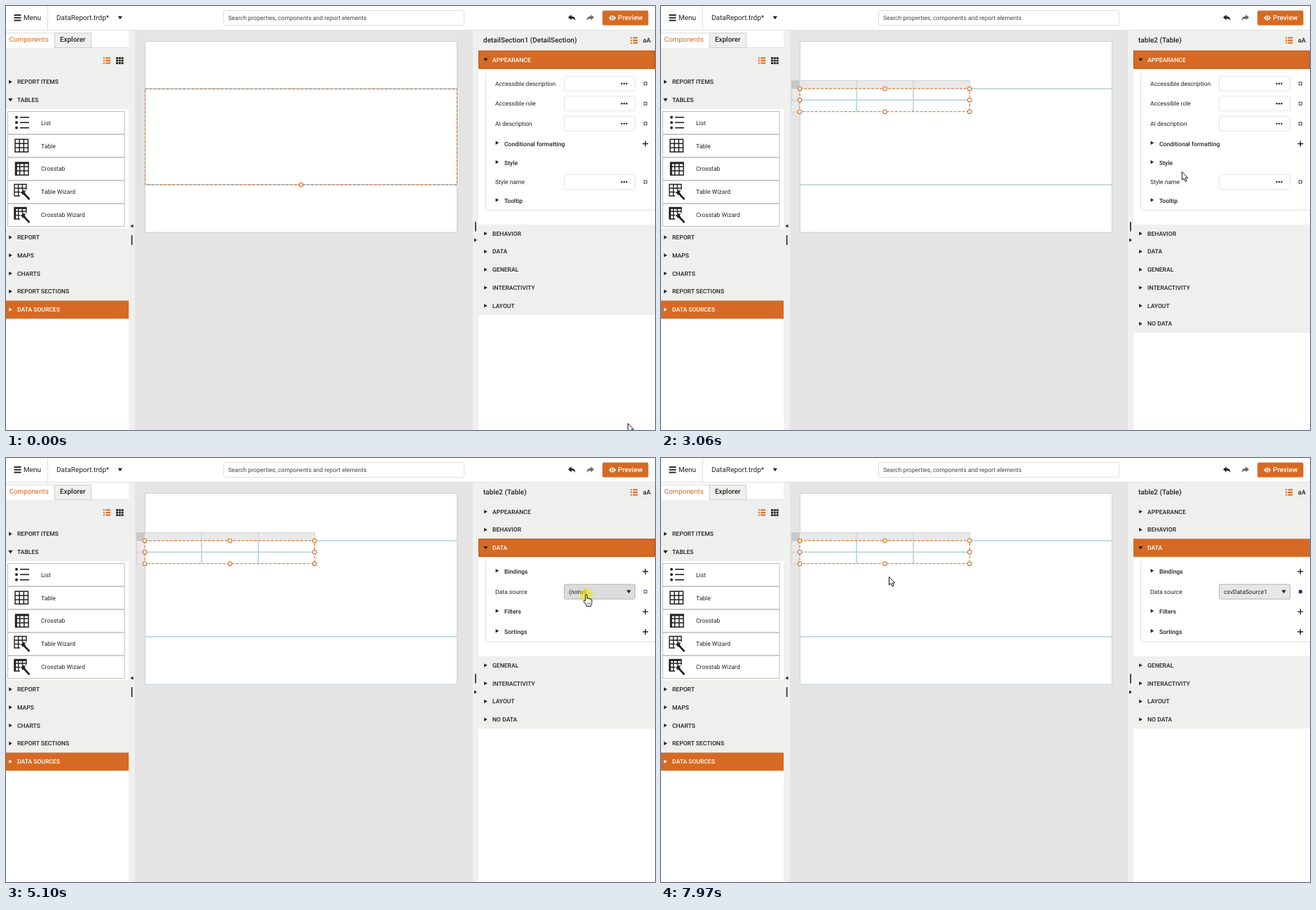
Recreate the animation shown at these times as an HTML page. Size 926 px wide and 605 px high, loop 8 s.

```html
<!DOCTYPE html>
<html lang="en">
<head>
<meta charset="utf-8">
<title>Report designer</title>
<style>
html, body { margin: 0; width: 100%; height: 100%; overflow: hidden; background: #fff; }
svg { display: block; width: 926px; height: 605px; }
text { font-family: Roboto, "Open Sans", sans-serif; text-rendering: geometricPrecision; white-space: pre; }
</style>
</head>
<body>
<svg id="stage" viewBox="0 0 926 605" xmlns="http://www.w3.org/2000/svg">
  <defs>
    <filter id="shade" x="-20%" y="-20%" width="140%" height="140%">
      <feDropShadow dx="0" dy="2" stdDeviation="2" flood-opacity=".22"/>
    </filter>
  </defs>
  <g id="frame"></g>
  <g id="live"></g>
</svg>
<script>
const LOOP = 8000;
const ORANGE = '#d66a24', PANEL = '#efefed', INK = '#222', BLUE = '#b4d0e0';
const ROW = 25.75, TOP = 63.7;

// drawing helpers
const rect = (x, y, w, h, fill, more = '') =>
  `<rect x="${x}" y="${y}" width="${w}" height="${h}" fill="${fill}" ${more}/>`;
const line = (d, color = INK, width = 1, more = '') =>
  `<path d="${d}" fill="none" stroke="${color}" stroke-width="${width}" ${more}/>`;
const shape = (d, fill = INK, more = '') => `<path d="${d}" fill="${fill}" ${more}/>`;
const dot = (x, y, r, fill, more = '') => `<circle cx="${x}" cy="${y}" r="${r}" fill="${fill}" ${more}/>`;
const text = (x, y, s, { size = 8.57, color = INK, weight = 400 } = {}) =>
  `<text x="${x}" y="${y}" font-size="${size}" fill="${color}" font-weight="${weight}">${s}</text>`;
const right = (x, y, c = INK) => shape(`M${x} ${y - 2.7}L${x + 4.6} ${y}L${x} ${y + 2.7}Z`, c);
const down = (x, y, c = INK) => shape(`M${x} ${y - 2.2}H${x + 6.4}L${x + 3.2} ${y + 2.4}Z`, c);
const border = c => `stroke="${c}" stroke-width="1"`;
const mix = (a, b, p) => `rgb(${a.map((v, i) => Math.round(v + (b[i] - v) * p))})`;
const each = (list, fn) => list.map(fn).join('');

function grid(x, y, w, h, width = 1.5) {
  const a = w / 3, b = h / 3;
  return line(`M${x} ${y}h${w}v${h}h${-w}zM${x + a} ${y}v${h}M${x + 2 * a} ${y}v${h}` +
    `M${x} ${y + b}h${w}M${x} ${y + 2 * b}h${w}`, INK, width);
}

function wizard(y, cross) {
  return grid(12, y - 10.5, 17, 16.5, 1.4) +
    (cross ? line(`M12 ${y - 9.5}h17M13 ${y - 10.5}v16.5`, INK, 2.4) : '') +
    shape(`M20 ${y - 3}h12v12h-12z`, '#fff') +
    line(`M25 ${y + 2}L33.5 ${y + 11}`, INK, 2.6) +
    shape(`M24 ${y - 4}l1.3 2.6 3-.4-1.6 2.5 1.6 2.6-3-.4-1.6 2.4-.7-2.9-2.8-1.1 2.6-1.5z`);
}

function bullets(x, y) {
  return each([-3.6, 0, 3.6], d =>
    rect(x, y + d - 1, 2, 2, ORANGE) + rect(x + 3.4, y + d - 1, 6.8, 2, ORANGE));
}

function topBar() {
  return rect(0, 0, 926, 35, '#fff') + line('M0 34.5H926M59.5 0V34', '#e0e0e0') +
    each([12, 15.8, 19.6], y => rect(11.5, y, 10, 1.9, INK)) +
    text(25, 20.3, 'Menu', { size: 10 }) +
    text(72, 20.3, 'DataReport.trdp*', { size: 10 }) + down(159.6, 16.8) +
    rect(310.5, 6.5, 343, 21, '#fff', border('#dedede') + ' rx="2"') +
    text(317, 20.3, 'Search properties, components and report elements', { color: '#444' }) +
    shape('M802 16.2l4.6-4v2.5c4 0 6 2.2 5.6 6.3-1-2.4-2.5-3.3-5.6-3.3v2.6z') +
    shape('M839 16.2l-4.6-4v2.5c-4 0-6 2.2-5.6 6.3 1-2.4 2.5-3.3 5.6-3.3v2.6z', '#666') +
    rect(851, 6.5, 65.5, 21, ORANGE, 'rx="2"') +
    shape('M860 17q5.2-7 10.4 0q-5.2 7-10.4 0z', '#fff') +
    dot(865.2, 17, 2.3, ORANGE) + dot(865.2, 17, 1.2, '#fff') +
    text(873, 20.3, 'Preview', { size: 10, color: '#fff', weight: 500 });
}

function leftPanel() {
  const heads = [['REPORT ITEMS', 108.3], ['TABLES', 134], ['REPORT', 330], ['MAPS', 355.8],
    ['CHARTS', 381.6], ['REPORT SECTIONS', 407.3], ['DATA SOURCES', 433.1]];
  const tools = ['List', 'Table', 'Crosstab', 'Table Wizard', 'Crosstab Wizard'];
  return rect(0, 35, 175, 570, '#fff') + rect(0, 60, 175, 87, PANEL) + rect(0, 317, 175, 104, PANEL) +
    rect(69.5, 38.5, 52, 21, PANEL, border('#cfcfcf')) + line('M0 38.5H69M122 59.5H175', '#dedede') +
    text(4.5, 51.3, 'Components', { size: 9.9, color: ORANGE }) +
    text(77, 51.3, 'Explorer', { size: 9.9, weight: 500 }) +
    bullets(138.8, 77.8) +
    each([0, 1, 2], i => each([0, 1, 2], j => rect(157 + i * 3.8, 73 + j * 3.6, 3, 2.7, INK))) +
    rect(0, 420.4, 175, 25.8, ORANGE) +
    each(heads, ([s, y], i) => {
      const color = i === 6 ? '#fff' : INK;
      return (i === 1 ? down(3.2, y) : right(4.2, y, color)) + text(16, y + 3.1, s, { weight: 500, color });
    }) +
    each(tools, (s, i) => rect(2.5, 150.5 + i * 32.9, 166.5, 32.4, '#fff', border('#bcbcbc')) +
      text(50, 169.6 + i * 32.9, s)) +
    each([158.8, 166.3, 173.8], y => dot(15, y, 2, INK) + rect(20, y - .8, 13, 1.6, INK)) +
    grid(13, 190.3, 18.5, 18) + grid(13.5, 223.3, 18.5, 18) +
    line('M13 224.2H32.6M14.4 223V241.6', INK, 2.8) + wizard(265, false) + wizard(298, true);
}

function middle() {
  return rect(175, 35, 9, 570, '#f0f0ef') + rect(184, 35, 482, 570, '#e4e4e4') +
    rect(666, 35, 8, 570, '#f0f0ef') +
    shape('M181.4 311.4V316.6L177.4 314Z') + rect(178.8, 327, 1.6, 14, INK) +
    rect(669.2, 308, 1.6, 13.5, INK) + shape('M668 331.4V336.6L672 334Z') +
    rect(198.5, 50.5, 445, 272.5, '#fff', border('#c3d5df')) +
    line('M198 118H644M198 255H644', BLUE, 1.5) +
    rect(674, 35, 252, 570, '#fff') + rect(674, 35, 252, 28.7, PANEL) +
    bullets(891, 49) + text(908.8, 52.4, 'aA', { size: 9.3, weight: 500 });
}

const dashed = (x, y, w, h) => rect(x, y, w, h, 'none', `stroke="${ORANGE}" stroke-dasharray="4 2"`);
const handle = (x, y) => dot(x, y, 2.8, '#fff', `stroke="${ORANGE}" stroke-width="1.1"`);

const sectionMark = () => dashed(198.5, 118.3, 445, 136.7) + handle(421, 255);

function table() {
  return rect(186.5, 106.5, 254, 11.5, '#e9e9e9', border('#d2d2d2')) +
    rect(186.5, 118, 11.5, 33, '#e9e9e9', border('#d2d2d2')) +
    rect(186, 106, 12, 12, '#c8c8c8') +
    line('M279 106V118M360 106V118M186 134.3H198', '#c9c9c9') +
    rect(198, 118, 242.5, 33, '#fff') +
    line('M279 118V151M360 118V151M198 134.3H440', BLUE, 1.5) +
    dashed(198, 118, 242.5, 32.7) +
    each([[198, 118], [319.5, 118], [440.3, 118], [198, 134.3], [440.3, 134.3],
      [198, 150.8], [319.5, 150.8], [440.3, 150.8]], p => handle(...p));
}

// property rows
const flag = (y, color = '#444', fill = '#fff') => rect(910.3, y - 2, 4, 4, fill, border(color));
const plus = y => line(`M908.3 ${y}h8M912.3 ${y - 4}v8`, INK, 1.4);
const group = (y, s) => right(698.6, y - 1.2) + text(711, y + 3.1, s, { weight: 500 });
const field = (y, s) => text(698, y + 3.1, s) +
  rect(796.5, y - 10.5, 101, 21, '#fff', border('#e4e4e4') + ' rx="2"') +
  each([878.6, 882, 885.4], x => dot(x, y, 1.2, INK)) + flag(y);

function appearanceRows(y) {
  return field(y + 21.3, 'Accessible description') + field(y + 49.8, 'Accessible role') +
    field(y + 78.4, 'AI description') +
    group(y + 107, 'Conditional formatting') + plus(y + 107) + group(y + 134.4, 'Style') +
    field(y + 161.5, 'Style name') + group(y + 188.6, 'Tooltip');
}

function dataRows(y, t) {
  const active = t >= 5010, picked = t >= 6750, s = y + 49.8;
  return group(y + 21.1, 'Bindings') + plus(y + 21.1) + text(698, s + 3.1, 'Data source') +
    rect(796.5, s - 10.5, 101, 21, active && !picked ? '#dcdcdc' : '#e7e7e7',
      border(active ? '#b5b5b5' : '#cfcfcf') + ' rx="2"') +
    text(803, s + 3.1, picked ? 'csvDataSource1' : '(none)') + down(885.4, s) +
    flag(s, active ? '#4a4596' : '#444', picked ? INK : '#fff') +
    group(y + 78.4, 'Filters') + plus(y + 78.4) + group(y + 107, 'Sortings') + plus(y + 107);
}

function body(y, h, id, rows) {
  if (h < 1) return '';
  const end = Math.max(y + 8, y + h - 20.6);
  return `<clipPath id="${id}">${rect(674, y, 252, end - y, '#000')}</clipPath>` +
    `<g clip-path="url(#${id})">${rows}</g>` +
    line(`M684.5 ${y + 7}V${end - 2}q0 2 2 2H926`, '#dedede');
}

function header(y, s, { open = false, glow = 0, focus = false } = {}) {
  const c = y + ROW / 2;
  return rect(674, y, 252, ROW + .2, mix([239, 239, 237], [214, 106, 36], glow)) +
    (focus ? rect(674.5, y + .5, 251, ROW - 1, 'none', border('#b5561a')) : '') +
    (open ? down(681.2, c) : right(682.2, c)) +
    text(694, c + 3.1, s, { weight: 500, color: mix([34, 34, 34], [255, 255, 255], glow) });
}

// progress that advances in n even jumps, the first at t0 and the last at t1
function jumps(t, t0, t1, n) {
  if (t < t0) return 0;
  if (t >= t1) return 1;
  return (Math.floor((t - t0) / (t1 - t0) * (n - 1) + 1e-6) + 1) / n;
}

function accordion(t) {
  const k = [4230, 4290, 4380, 4450].filter(v => t >= v).length;
  const shut = [0, .2, .65, .95, 1][k], open = [0, .3, .745, .97, 1][k], fade = [0, .2, .5, .85, 1][k];
  const lit = t < 1900 ? 1 : jumps(t, 1980, 2120, 3);
  const h1 = 222.3 * (1 - shut), h2 = 142 * open;
  const names = ['BEHAVIOR', 'DATA', 'GENERAL', 'INTERACTIVITY', 'LAYOUT'];
  if (t >= 1900) names.push('NO DATA');
  let y = TOP + ROW;
  let out = header(TOP, 'APPEARANCE', { open: k === 0, glow: lit * (1 - fade), focus: k === 0 && lit === 1 }) +
    body(y, h1, 'clipA', appearanceRows(y));
  y += h1;
  for (const s of names) {
    const isData = s === 'DATA';
    out += header(y, s, isData ? { open: k > 0, glow: fade, focus: k > 2 && t < 5230 } : {});
    y += ROW;
    if (isData) {
      out += body(y, h2, 'clipD', dataRows(y, t));
      y += h2;
    }
  }
  return out;
}

function dropdown(t, hover) {
  const p = jumps(t, 5300, 5440, 3) - jumps(t, 6820, 6970, 3);
  if (p <= 0) return '';
  const items = ['(none)', 'csvDataSource1', 'sqlDataSource1', 'webServiceDataSource1',
    'jsonDataSource1', 'objectDataSource1', 'objectDataSource2'];
  const chosen = t >= 6750 ? 1 : 0;
  return `<clipPath id="clipL">${rect(785, 202, 130, 140, '#000')}</clipPath><g clip-path="url(#clipL)">` +
    `<g transform="translate(0 ${(p - 1) * 128})">` +
    rect(797, 202, 105, 126.5, '#fff', 'filter="url(#shade)"') +
    rect(797, 202, 105, 126.5, '#fff', border('#d8d8d8')) +
    each(items, (s, i) => {
      const y = 202 + i * 18, on = i === chosen;
      const back = on ? rect(797.5, y + .5, 104, 17.5, ORANGE, border('#b5561a'))
        : i === 1 && hover ? rect(797.5, y, 104, 18, '#ebebeb') : '';
      return back + text(803, y + 12.1, s, { color: on ? '#fff' : INK });
    }) + '</g></g>';
}

// pointer moves: first jump, time between jumps, jumps, end x, end y, eased
const MOVES = [
  [70, 65.7, 8, 402, 165, 1],
  [690, 83.3, 7, 70, 198, 1],
  [2620, 73, 4, 400, 186, 0],
  [2912, 73, 3, 743, 236, 0],
  [3131, 73, 1, 751, 262, 0],
  [3204, 72, 4, 705, 357, 0],
  [3500, 65, 3, 688, 348, 0],
  [3780, 60, 2, 688, 346, 0],
  [4550, 76.6, 7, 828, 195, 1],
  [5790, 74.2, 8, 827, 226.5, 1],
  [7600, 74, 6, 325, 169, 1]
];
const CLICKS = [[1560, 1710], [4000, 4230], [5100, 5230], [6600, 6750]];

function pointerAt(t) {
  let x = 887, y = 595;
  for (const [t0, dt, n, ex, ey, eased] of MOVES) {
    if (t < t0) break;
    let p = Math.min(n, Math.floor((t - t0) / dt + 1e-6) + 1) / n;
    if (eased) p = (1 - Math.cos(Math.PI * p)) / 2;
    x += (ex - x) * p;
    y += (ey - y) * p;
  }
  return [x, y];
}

function pointerKind(t, x, y) {
  const inSection = x > 198 && x < 644 && y > 118 && y < 255;
  if (x < 170 || (t < 1900 && inSection)) return 'move';
  if (x > 674 && t > 3200 && t < 7600 && (y > 283 || x > 797)) return 'hand';
  return 'arrow';
}

const edge = 'stroke="#111" stroke-width="1" stroke-linejoin="round"';
const POINTERS = {
  arrow: shape('M.4.6V12.2L3 9.9l2.1 4.4 2-.9L5.1 9.2H8.6Z', '#fff', edge),
  hand: shape('M-1.2 1.2q0-1.4 1.2-1.4t1.2 1.4V6q.2-1 1.3-.9t1.1 1.2q.2-.9 1.2-.8t1.1 1.3q.3-.7 1.1-.5t.9 1.3' +
    'V11.4q0 2-1.3 3.4V16.6H.2V15L-3.4 10.2q-.8-1.2.1-1.8t2.1.9Z', '#fff', edge) +
    line('M1.6 11v3M3.6 11v3M5.4 11v3', '#333', .6),
  move: shape('M0-7.6L3-4.4H1.3V-1.3H4.4V-3L7.6 0 4.4 3V1.3H1.3V4.4H3L0 7.6-3 4.4H-1.3V1.3H-4.4V3' +
    'L-7.6 0-4.4-3V-1.3H-1.3V-4.4H-3Z', '#fff', edge)
};

function pointer(t, x, y) {
  const pressed = CLICKS.some(([a, b]) => t >= a && t < b);
  return (pressed ? dot(x, y + .3, 9, '#f2e600', 'opacity=".6"') : '') +
    `<g transform="translate(${x.toFixed(2)} ${y.toFixed(2)})">${POINTERS[pointerKind(t, x, y)]}</g>`;
}

function scene(t) {
  const [x, y] = pointerAt(t);
  const title = t < 1900 ? 'detailSection1 (DetailSection)' : 'table2 (Table)';
  return (t < 1900 ? sectionMark() : table()) +
    text(681, 52.3, title, { size: 10, weight: 500 }) +
    accordion(t) + dropdown(t, y > 220) + pointer(t, x, y);
}

const live = document.getElementById('live');
document.getElementById('frame').innerHTML = topBar() + leftPanel() + middle();

let shown = '';
function draw(t) {
  const next = scene(t);
  if (next !== shown) live.innerHTML = shown = next;
}

const start = performance.now();
function tick() {
  draw((performance.now() - start) % LOOP);
  requestAnimationFrame(tick);
}
tick();
</script>
</body>
</html>
```
